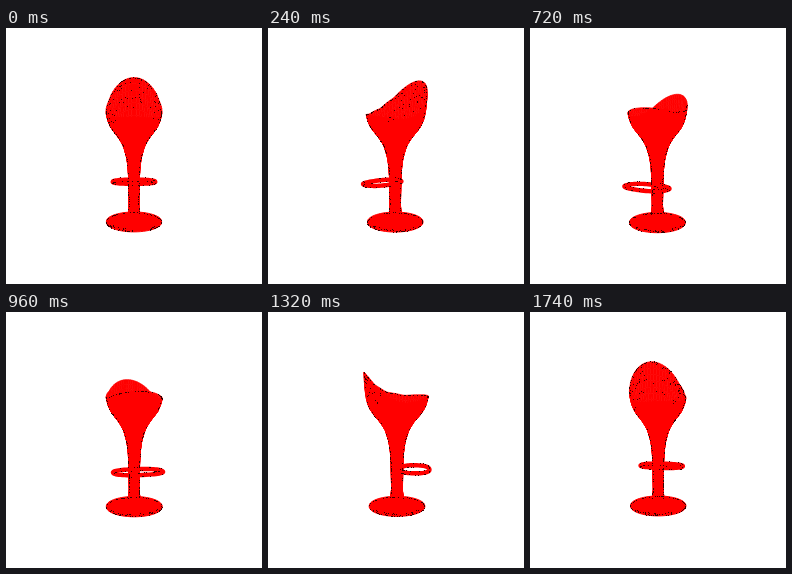
Animation of 256x256 px, one loop 1800 ms. Source, as an HTML page with a canvas:

```html
<!DOCTYPE html>
<html lang="en">
<head>
<meta charset="utf-8">
<title>Turning bar stool</title>
<style>
  html, body { margin: 0; width: 100%; height: 100%; overflow: hidden; background: #fff; }
  canvas { display: block; width: 256px; height: 256px; }
</style>
</head>
<body>
<canvas id="stage" width="256" height="256"></canvas>
<script>
const ctx = document.getElementById('stage').getContext('2d');
const STEP = 60, STEPS = 30, TAU = Math.PI * 2;
const CX = 128, HORIZON = 120, DIST = 214;
const RED = '#f00', DARK = '#3a0000';

// Heights are screen rows on the turning axis; the stool faces along +front.
const PROFILE = [[58, 33], [73, 32.3], [85, 31], [93, 29], [100, 25.6], [105, 21.5], [110, 17],
  [118, 11.8], [130, 8], [140, 6.6], [152, 5.9], [178, 5.4], [187, 6.4]];
const RIM = [[-33, 60], [-20, 76.5], [-7, 85], [10, 88], [24, 86.5], [33, 85]];
const SEAT_WIDTH = 0.9;
const BASE_Y = 193, BASE_R = 27.5;

function lerpTable(table, x) {
  let i = 1;
  while (i < table.length - 1 && x > table[i][0]) i++;
  const [x0, y0] = table[i - 1], [x1, y1] = table[i];
  const k = Math.min(1, Math.max(0, (x - x0) / (x1 - x0)));
  return y0 + (y1 - y0) * k;
}

function seeded(seed) {
  return () => (seed = (seed * 16807) % 2147483647) / 2147483647;
}

let sin = 0, cos = 1;

function project(front, side, y) {
  front += 1;
  const depth = front * cos + side * sin;
  const scale = DIST / (DIST + depth);
  return [CX + (side * cos - front * sin) * scale, HORIZON + (y - HORIZON) * scale];
}

function shell(phi, y) {
  const r = lerpTable(PROFILE, y);
  return project(r * Math.cos(phi), r * SEAT_WIDTH * Math.sin(phi), y);
}

const rimY = phi => lerpTable(RIM, 33 * Math.cos(phi));
const disc = (phi, y) => project(BASE_R * Math.cos(phi), BASE_R * Math.sin(phi), y);

// Squarish footrest in front of the stem.
function loop(phi) {
  const bend = v => Math.sign(v) * Math.abs(v) ** 0.85;
  return project(17.5 + 14.5 * bend(Math.cos(phi)), 23 * bend(Math.sin(phi)), 156.5);
}

function trace(points) {
  ctx.beginPath();
  points.forEach(p => ctx.lineTo(p[0], p[1]));
  ctx.closePath();
}

const around = (n, fn) => Array.from({ length: n }, (_, i) => fn(i / n * TAU));

function drawBody() {
  ctx.fillStyle = ctx.strokeStyle = RED;
  ctx.lineJoin = 'round';
  ctx.lineWidth = 0.6;
  const cols = 72, rows = 24;
  const columns = around(cols, phi => {
    const top = rimY(phi);
    return Array.from({ length: rows + 1 }, (_, j) => shell(phi, top + (187 - top) * j / rows));
  });
  columns.forEach((a, i) => {
    const b = columns[(i + 1) % cols];
    for (let j = 0; j < rows; j++) {
      trace([a[j], b[j], b[j + 1], a[j + 1]]);
      ctx.fill();
      ctx.stroke();
    }
  });

  ctx.lineWidth = 1;
  for (const y of [BASE_Y - 0.5, BASE_Y + 0.5]) {
    trace(around(60, phi => disc(phi, y)));
    ctx.fill();
    ctx.stroke();
  }

  ctx.lineWidth = 4.4;
  trace(around(60, loop));
  ctx.stroke();
}

function dot([x, y]) {
  ctx.fillRect(Math.floor(x), Math.floor(y), 1, 1);
}

// Dark flecks along the edges and over the outside of the backrest.
function drawFlecks(step, turn) {
  const rnd = seeded(4211 + step * 977);
  const facing = phi => Math.cos(phi - turn);
  ctx.fillStyle = DARK;

  for (let i = 0; i < 80; i++) {
    const phi = rnd() * TAU;
    if (facing(phi) < 0) dot(shell(phi, rimY(phi) + 0.4));
  }
  for (let i = 0; i < 90; i++) {
    const edge = turn + (rnd() < 0.5 ? 1 : -1) * Math.PI / 2;
    const top = rimY(edge);
    dot(shell(edge, top + (187 - top) * rnd()));
  }
  for (let i = 0; i < 60; i++) {
    dot(disc(rnd() * TAU, BASE_Y + 0.5));
  }
  for (let i = 0; i < 24; i++) {
    const phi = turn + Math.PI + (rnd() - 0.5) * 1.8;
    dot(disc(phi, BASE_Y - rnd() * 2));
  }
  for (let i = 0; i < 34; i++) {
    const [x, y] = loop(rnd() * TAU);
    dot([x, y + (rnd() < 0.5 ? -2 : 1.8)]);
  }
  for (let i = 0; i < 75; i++) {
    const phi = Math.PI + (rnd() - 0.5) * 2.4;
    const y = rimY(phi) + rnd() ** 1.3 * 26;
    if (facing(phi) < -0.3 && y < 97) dot(shell(phi, y));
  }
}

function draw(step) {
  const turn = step / STEPS * TAU;
  sin = Math.sin(turn);
  cos = Math.cos(turn);
  ctx.fillStyle = '#fff';
  ctx.fillRect(0, 0, 256, 256);
  drawBody();
  drawFlecks(step, turn);
}

let shown = -1;
function tick() {
  const step = Math.floor(performance.now() / STEP) % STEPS;
  if (step !== shown) draw(shown = step);
  requestAnimationFrame(tick);
}
tick();
</script>
</body>
</html>
```
